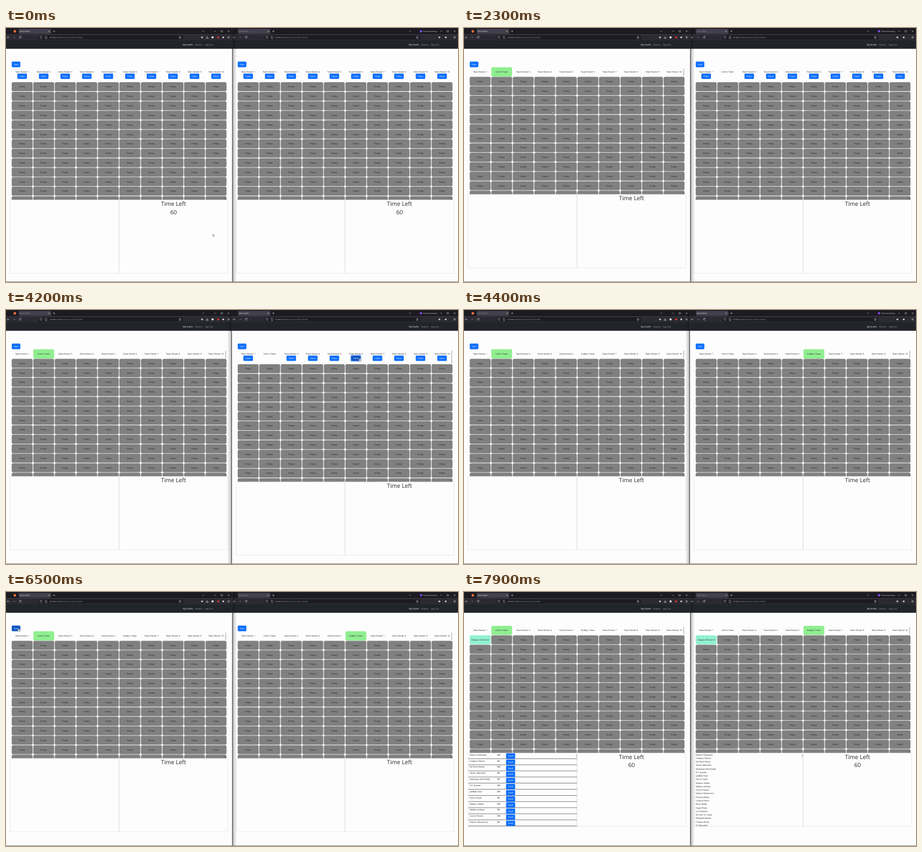
Animation, 800 px wide and 450 px high, one loop 8 s. Source, as an HTML page:

```html
<!DOCTYPE html>
<html lang="en">
<head>
<meta charset="utf-8">
<title>Mock Draft</title>
<style>
  html, body { margin: 0; width: 100%; height: 100%; overflow: hidden; background: #fdfdfd; }
  svg { display: block; width: 800px; height: 450px; }
  text { font-family: "Open Sans", "Noto Sans", sans-serif; text-rendering: geometricPrecision; white-space: pre; }
</style>
</head>
<body>
<script>
const LOOP = 8000;
const SHIFT = 9.7;       // height lost when a row of buttons goes away
const COL = 38.13, ROW = 16.82;
const INK = '#212529', BLUE = '#0d6efd', BLUE_HOVER = '#0a55c4';

const TEAMS = { 1: "Colin's Team", 5: "Ruddy's Team" };
const PICK = 'Gregory Tolman III';
const PLAYERS = [
  'Martin Hollowick', 'Frederic Pilmer', "De'Vonn Brask", 'Tavion Merwick',
  'Sebastian McOrrelly', 'R.T. Quelm', 'JoeBee Fosk', 'Dorrin Vask', 'Marlon Twibb',
  'Walton Imbrey', 'Corvin Tessle', 'Morris Olivanne Jr.', 'Paul Endicker',
  'Lomark Venn', 'Rory Glabb', 'Hugh Plosk', 'Lou Farbins', 'Elo-Vin St. Crask',
  'Rolando Ibbem', "L'Orenn Brisk", 'PV Wendorf'
];
const POSITIONS = 'WR RB WR RB RB WR WR RB WR RB WR RB'.split(' ');

// time, x, y of the pointer tip
const PATH = [
  [0, 366, 365], [100, 366, 365], [400, 365, 343], [550, 365, 343], [1400, 63, 85],
  [1700, 67, 85], [2100, 67, 85], [2600, 290, 241], [3000, 492, 84], [3500, 630, 77],
  [3700, 698, 84], [3950, 626, 85], [4700, 626, 85], [5150, 400, 92], [5600, 165, 76],
  [6300, 22, 64], [6900, 22, 64], [7800, 55, 206], [7900, 60, 223], [8000, 61, 226]
];

function el(name, attrs, parent, content) {
  const node = document.createElementNS('http://www.w3.org/2000/svg', name);
  for (const key in attrs) node.setAttribute(key, attrs[key]);
  if (content !== undefined) node.textContent = content;
  return parent ? parent.appendChild(node) : node;
}
const group = parent => el('g', {}, parent);
const box = (p, x, y, width, height, fill, rx = 0) => el('rect', { x, y, width, height, fill, rx }, p);
const dot = (p, cx, cy, r, fill) => el('circle', { cx, cy, r, fill }, p);
const line = (p, d, stroke, w = 0.5) =>
  el('path', { d, stroke, fill: 'none', 'stroke-width': w, 'stroke-linecap': 'round' }, p);
const text = (p, x, y, size, fill, content, anchor = 'middle') =>
  el('text', { x, y, 'font-size': size, fill, 'text-anchor': anchor }, p, content);
const show = (node, on) => node.setAttribute('display', on ? 'inline' : 'none');
const moveTo = (node, x, y) => node.setAttribute('transform', `translate(${x} ${y})`);

const svg = el('svg', { viewBox: '0 0 800 450', width: 800, height: 450 }, document.body);
const defs = el('defs', {}, svg);
const clip = el('clipPath', { id: 'rows' }, defs);
box(clip, 0, 95, 400, 209.4);
const fade = el('linearGradient', { id: 'fade' }, defs);
for (const [offset, opacity] of [[0, 0.45], [0.35, 0.17], [1, 0]])
  el('stop', { offset, 'stop-color': '#000', 'stop-opacity': opacity }, fade);

const buttons = [];
function button(p, ox, x, y, w, h, label) {
  const g = group(p);
  const ring = el('rect', { x: x - 0.7, y: y - 0.7, width: w + 1.4, height: h + 1.4, rx: 2,
    fill: 'none', stroke: '#86b7fe', 'stroke-width': 1.2, display: 'none' }, g);
  const face = box(g, x, y, w, h, BLUE, 1.4);
  text(g, x + w / 2, y + h / 2 + 1.35, 3.85, '#fff', label);
  const b = { g, ring, face, x: ox + x, y, w, h, on: true };
  buttons.push(b);
  return b;
}
function setButton(b, on) { b.on = on; show(b.g, on); }

function drawBrowser(p, left) {
  const light = '#e6e6ea', dim = '#a5a5ad';
  box(p, 0, 0, 400, 11.5, '#1c1b22');
  box(p, 0, 11.2, 400, 11, '#2b2a33');
  const tabX = left ? 22.5 : 10.5;
  box(p, tabX, 1.4, 57.5, 8.8, '#42414d', 1.4);
  const title = text(p, tabX + 2, 7, 3.35, light, 'Mock Draft', 'start');
  const close = (x, y, r) => line(p, `M${x - r} ${y - r}l${2 * r} ${2 * r}M${x + r} ${y - r}l${-2 * r} ${2 * r}`, light);
  const plus = tabX + 62.7;
  close(tabX + 53.5, 5.8, 0.9);
  line(p, `M${plus - 1.4} 5.8h2.8M${plus} 4.4v2.8`, light);
  if (left) dot(p, 15.6, 5.9, 2.3, '#f0703a');
  else {
    dot(p, 334.5, 5.8, 2, '#8a4dff');
    text(p, 338.3, 7, 3.15, light, 'Private browsing', 'start');
  }
  const chev = left ? 349 : 315;
  line(p, `M${chev - 1.3} 5.2l1.3 1.3l1.3-1.3`, light);
  line(p, 'M368.8 5.8h2.6M380.8 4.6h2.5v2.5h-2.5z', light, 0.45);
  close(394, 5.8, 1.2);

  line(p, 'M5.8 16.6h-3.6m1.4-1.4l-1.4 1.4l1.4 1.4', light);
  line(p, 'M12.5 16.6h3.6m-1.4-1.4l1.4 1.4l-1.4 1.4', '#77767f');
  line(p, 'M26.4 15.5a1.7 1.7 0 1 0 .3 1.6M26.6 14.5v1.2h-1.2', light);
  const end = left ? 313 : 333;
  box(p, 58, 13, end - 58, 7.3, '#1c1b22', 1.2);
  line(p, 'M60.4 15.2l1.7-.6l1.7.6c0 2-.5 3-1.7 3.7c-1.2-.7-1.7-1.7-1.7-3.7z', light, 0.45);
  line(p, 'M69.8 14.7h1.8l.7.8v3.1h-2.5z', light, 0.45);
  const url = text(p, left ? 76.8 : 75.8, 17.8, 3.05, dim, '', 'start');
  el('tspan', { fill: '#fbfbfe' }, url, '127.0.0.1');
  el('tspan', {}, url, ':8000/draft/rooms/2831723240/');
  const star = end - 5;
  line(p, `M${star} 14.7l.6 1.3l1.4.2l-1 1l.2 1.4l-1.2-.7l-1.2.7l.2-1.4l-1-1l1.4-.2z`, light, 0.45);
  const pocket = left ? 347 : 367;
  dot(p, pocket, 16.6, 1.7, '#bdbdc4');
  if (left) {
    line(p, 'M356 14.8v2.4m-1-1l1 1l1-1M354.3 17.4v1.1h3.4v-1.1', light);
    dot(p, 365.6, 16.6, 1.9, '#f1f1f3');
    dot(p, 375.4, 16.6, 1.8, '#e0342c');
    dot(p, 384.5, 16.6, 1.6, '#d0d0d6');
  } else dot(p, 378.3, 16.6, 1.6, '#d0d0d6');
  line(p, 'M392.5 15.3h3M392.5 16.6h3M392.5 17.9h3', light, 0.45);

  box(p, 0, 22, 400, 14.8, '#212529');
  text(p, 313, 31.3, 3.95, '#fff', 'My Drafts', 'start');
  text(p, 335, 31.3, 3.95, '#9b9d9f', 'Rooms', 'start');
  text(p, 351.8, 31.3, 3.95, '#9b9d9f', 'Log Out', 'start');
  return title;
}

function makeWindow(ox, left) {
  const root = group(svg);
  moveTo(root, ox, 0);
  box(root, 0, 0, 400, 450, '#fdfdfd');
  const title = drawBrowser(root, left);
  const start = button(root, ox, 10.2, 59.6, 15.2, 9.8, 'Start');
  const own = left ? 1 : 5;

  const head = group(root);
  const mine = box(head, 10.2 + own * COL, 69.6, 36.9, 16.4, '#90ee90', 2.4);
  const bar = box(head, 388.5, 72, 0.8, 23, '#8b8b8b');
  const names = [], claims = [];
  for (let c = 0; c < 10; c++) {
    const mid = 28.6 + c * COL;
    names.push(text(head, mid, 79.2, 3.75, INK, ''));
    claims.push(button(head, ox, mid - 8.4, 80.8, 16.8, 9.4, 'Claim'));
  }

  const body = group(root);
  const cells = el('g', { 'clip-path': 'url(#rows)' }, body);
  let pickCell, pickText;
  for (let r = 0; r < 13; r++) for (let c = 0; c < 10; c++) {
    const x = 10.1 + c * COL, y = 96.1 + r * ROW;
    const cell = box(cells, x, y, 37, 16, '#808080', 2.6);
    const label = text(cells, x + 18.5, y + 9.3, 3.65, '#1b1d1f', 'Empty');
    if (!r && !c) [pickCell, pickText] = [cell, label];
  }
  line(body, 'M386.8 303.4l2-2M388 303.4l.8-.8', '#333', 0.4);
  for (const x of [7.6, 200.2])
    el('rect', { x, y: 304.6, width: 192.2, height: 130, fill: 'none', stroke: '#dcdcdc', 'stroke-width': 0.6 }, body);
  text(body, 296.5, 315, 10.25, INK, 'Time Left');
  const timer = text(body, 296.5, 329.7, 10.1, INK, '60');

  const list = group(body);
  if (left) POSITIONS.forEach((pos, i) => {
    const y = 304.7 + i * 10.85;
    text(list, 10.2, y + 4.5, 3.85, INK, PLAYERS[i], 'start');
    text(list, 58.5, y + 4.5, 3.85, INK, pos, 'start');
    box(list, 7.6, y + 9.6, 192.2, 0.75, '#555');
    box(list, 74.5, y + 0.5, 16, 9.4, BLUE, 1.2);
    text(list, 82.5, y + 6.6, 3.85, '#fff', 'Draft');
  });
  else PLAYERS.forEach((name, i) => text(list, 10.2, 309.1 + i * 6.255, 3.85, INK, name, 'start'));
  box(list, 198.5, 307.4, 0.8, 4.8, '#8b8b8b');

  return function update(s) {
    title.setAttribute('fill', s.focus ? '#f4f4f6' : '#96959e');
    setButton(start, !s.started);
    moveTo(head, 0, s.started ? -SHIFT : 0);
    moveTo(body, 0, -SHIFT * (s.claimed + s.started));
    show(mine, s.claimed);
    show(bar, s.bar);
    bar.setAttribute('height', s.claimed ? 13 : 23);
    names.forEach((n, c) => { n.textContent = s.taken.includes(c) ? TEAMS[c] : 'Team Roster ' + (c + 1); });
    claims.forEach((b, c) => setButton(b, !s.claimed && !s.taken.includes(c)));
    show(claims[own].ring, s.pressed);
    show(timer, s.timer);
    show(list, s.list);
    pickCell.setAttribute('fill', s.picked ? '#92f1d2' : '#808080');
    pickText.textContent = s.picked ? PICK : 'Empty';
  };
}

const updateLeft = makeWindow(0, true);
const updateRight = makeWindow(400, false);

const seam = group(svg);
box(seam, 0, 0, 8, 450, 'url(#fade)');
box(seam, 0, 0, 0.8, 450, '#35343b');
box(svg, 0, 449.2, 800, 0.8, '#77767c');

const cursor = group(svg);
const arrow = el('path', { d: 'M0 0v4l1-.9l.7 1.5l.7-.3l-.7-1.5h1.2z', fill: '#fff', stroke: '#222', 'stroke-width': 0.4 }, cursor);
const hand = el('path', { d: 'M-.5 .3q.5-.6 1 0v1.7l2 .5q.5.2.3 1l-.5 1.7h-2.7l-1.5-2q.3-.7 1.4 0z',
  fill: '#fff', stroke: '#222', 'stroke-width': 0.4 }, cursor);

function pointerAt(t) {
  const i = PATH.findIndex(p => p[0] > t);
  const [t0, x0, y0] = PATH[i - 1], [t1, x1, y1] = PATH[i];
  const k = (t - t0) / (t1 - t0);
  return [x0 + (x1 - x0) * k, y0 + (y1 - y0) * k];
}

function render(t) {
  const leftFront = t < 4050 || t >= 6400;
  const shared = { started: t >= 6600, timer: t < 1700 || t >= 6600, picked: t >= 6700 };
  const taken = (first, second) => [t >= first && 1, t >= second && 5].filter(Boolean);
  updateLeft({ ...shared, focus: leftFront, claimed: t >= 1900, taken: taken(1900, 4300),
    bar: t >= 700, pressed: t >= 1600, list: t >= 6700 });
  updateRight({ ...shared, focus: !leftFront, claimed: t >= 4400, taken: taken(1700, 4400),
    bar: t >= 2900, pressed: t >= 4100, list: t >= 6600 });
  seam.setAttribute('transform', leftFront ? 'translate(400.4 0)' : 'translate(399.8 0) scale(-1 1)');

  const [x, y] = pointerAt(t);
  let over = false;
  for (const b of buttons) {
    const hit = b.on && x > b.x && x < b.x + b.w && y > b.y && y < b.y + b.h;
    b.face.setAttribute('fill', hit ? BLUE_HOVER : BLUE);
    over = over || hit;
  }
  moveTo(cursor, x, y);
  show(arrow, !over);
  show(hand, over);
}

const began = performance.now();
function tick() {
  render((performance.now() - began) % LOOP);
  requestAnimationFrame(tick);
}
tick();
</script>
</body>
</html>
```
